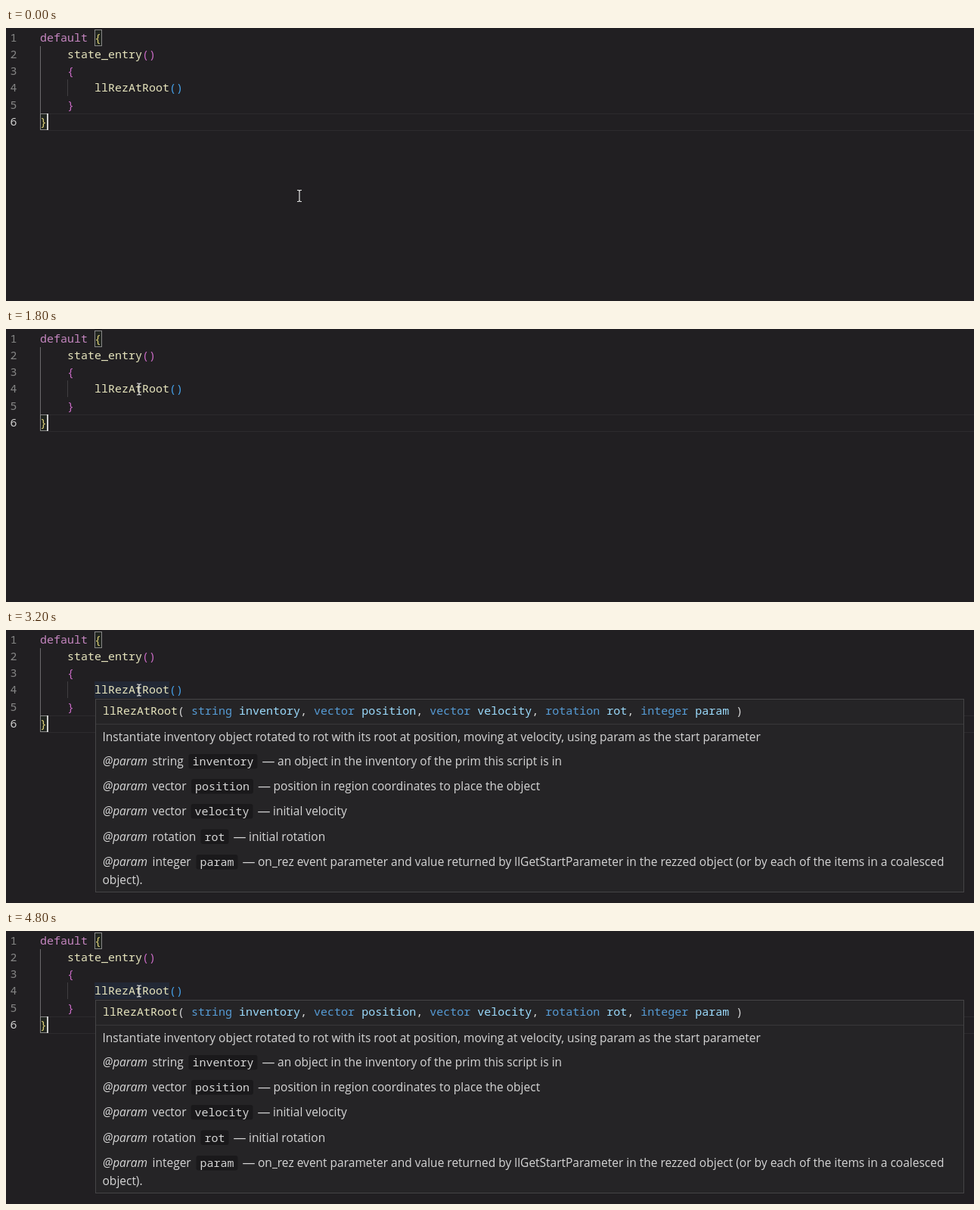
An HTML page for the animation above (5000 ms loop, 1280 by 361 pixels).

```html
<!DOCTYPE html>
<html lang="en">
<head>
<meta charset="utf-8">
<title>Function hover help</title>
<style>
html, body { margin: 0; width: 100%; height: 100%; overflow: hidden; background: #211f22; }
svg { display: block; }
text { white-space: pre; fill: #d6d6d6; }
.code { font: 500 15px "Noto Sans Mono", monospace; }
.prose { font: 15.52px "Open Sans", sans-serif; }
.key { fill: #c586c0; }
.fn { fill: #e6e4bd; }
.b1 { fill: #dccf78; }
.b2 { fill: #c86ac4; }
.b3 { fill: #459fe6; }
.type { fill: #569cd6; }
.arg { fill: #9cdcfe; }
.num { fill: #858585; font-weight: 400; }
.now { fill: #d0d0d0; font-weight: 400; }
.match { fill: #212520; stroke: #888; }
</style>
</head>
<body>
<svg width="1280" height="361" viewBox="0 0 1280 361">
  <path d="M56 113.5H1280M56 135.5H1280" stroke="#2d2b2e"/>
  <path d="M45.5 24V113" stroke="#6c6a6d"/>
  <path d="M81.5 68V90" stroke="#403e41"/>
  <rect class="match" x="117.5" y="2.5" width="9" height="21"/>
  <rect class="match" x="45.5" y="113.5" width="9" height="21"/>
  <rect id="word" x="117" y="68" width="99" height="22" fill="#222835"/>
  <g id="editor" class="code"></g>
  <rect id="caret" x="54" y="113" width="2" height="22" fill="#d0d0d0"/>
  <g id="hover">
    <rect x="118.5" y="91.5" width="1148" height="255" fill="#252426" stroke="#454446"/>
    <path d="M119 124.5H1266" stroke="#39383a"/>
    <g id="help"></g>
  </g>
  <path id="pointer" d="M-3 -7.5H-1L0 -6.5L1 -7.5H3M0 -6.5V6.5M-3 7.5H-1L0 6.5L1 7.5H3" fill="none" stroke="#e4e4e4" stroke-width="1.2"/>
</svg>
<script>
const $ = id => document.getElementById(id);
const span = (cls, str) => `<tspan class="${cls}">${str}</tspan>`;
const text = (cls, x, y, str) => `<text class="${cls}" x="${x}" y="${y}" xml:space="preserve">${str}</text>`;

const CHAR = 9;
const lines = [
  [0, span("key", "default") + " " + span("b1", "{")],
  [4, span("fn", "state_entry") + span("b2", "()")],
  [4, span("b2", "{")],
  [8, span("fn", "llRezAtRoot") + span("b3", "()")],
  [4, span("b2", "}")],
  [0, span("b1", "}")]
];
$("editor").innerHTML = lines.map(([indent, str], i) => {
  const y = 17.5 + 22.3 * i;
  return text(i === 5 ? "now" : "num", 5.5, y, i + 1) + text("", 45 + indent * CHAR, y, str);
}).join("");

// type, name, name x, baseline, description
const params = [
  ["string", "inventory", 246.5, 179, "an object in the inventory of the prim this script is in"],
  ["vector", "position", 250, 212, "position in region coordinates to place the object"],
  ["vector", "velocity", 249.5, 245, "initial velocity"],
  ["rotation", "rot", 262.5, 278.5, "initial rotation"],
  ["integer", "param", 256.5, 312, "on_rez event parameter and value returned by llGetStartParameter in the rezzed object (or by each of the items in a coalesced"]
];
const signature = params.map(([type, name]) => span("type", type) + " " + span("arg", name)).join(", ");

$("help").innerHTML =
  text("code", 128, 112, span("fn", "llRezAtRoot") + `( ${signature} )`) +
  text("prose", 127.5, 147, "Instantiate inventory object rotated to rot with its root at position, moving at velocity, using param as the start parameter") +
  params.map(([type, name, x, y, about]) => {
    const end = x + name.length * CHAR;
    return text("prose", 128, y, '<tspan font-style="italic">@param</tspan>') +
      text("prose", 193.5, y, type) +
      `<rect x="${x - 5}" y="${y - 15}" width="${end - x + 10}" height="19.5" rx="3" fill="#1a191b"/>` +
      text("code", x, y, name) +
      text("prose", end + 11, y, '<tspan font-size="17">—</tspan>') +
      text("prose", end + 31.5, y, about);
  }).join("") +
  text("prose", 127.5, 336, "object).");

// Pointer position at each 200 ms step, then at rest
const path = [[388, 222], [332, 188], [299, 163], [278, 152], [248.5, 132.5],
  [229, 118], [203, 98], [185, 85], [171, 80.5], [176, 79.5]];

function draw(now) {
  const t = now % 5000;
  const [x, y] = path[Math.min(Math.floor(t / 200), path.length - 1)];
  $("pointer").setAttribute("transform", `translate(${x} ${y})`);
  const blink = t % 1000;
  $("caret").style.visibility = blink >= 400 && blink < 800 ? "hidden" : "visible";
  $("hover").style.visibility = $("word").style.visibility = t >= 2000 ? "visible" : "hidden";
}

const start = performance.now();
function tick() {
  draw(performance.now() - start);
  requestAnimationFrame(tick);
}
tick();
</script>
</body>
</html>
```
